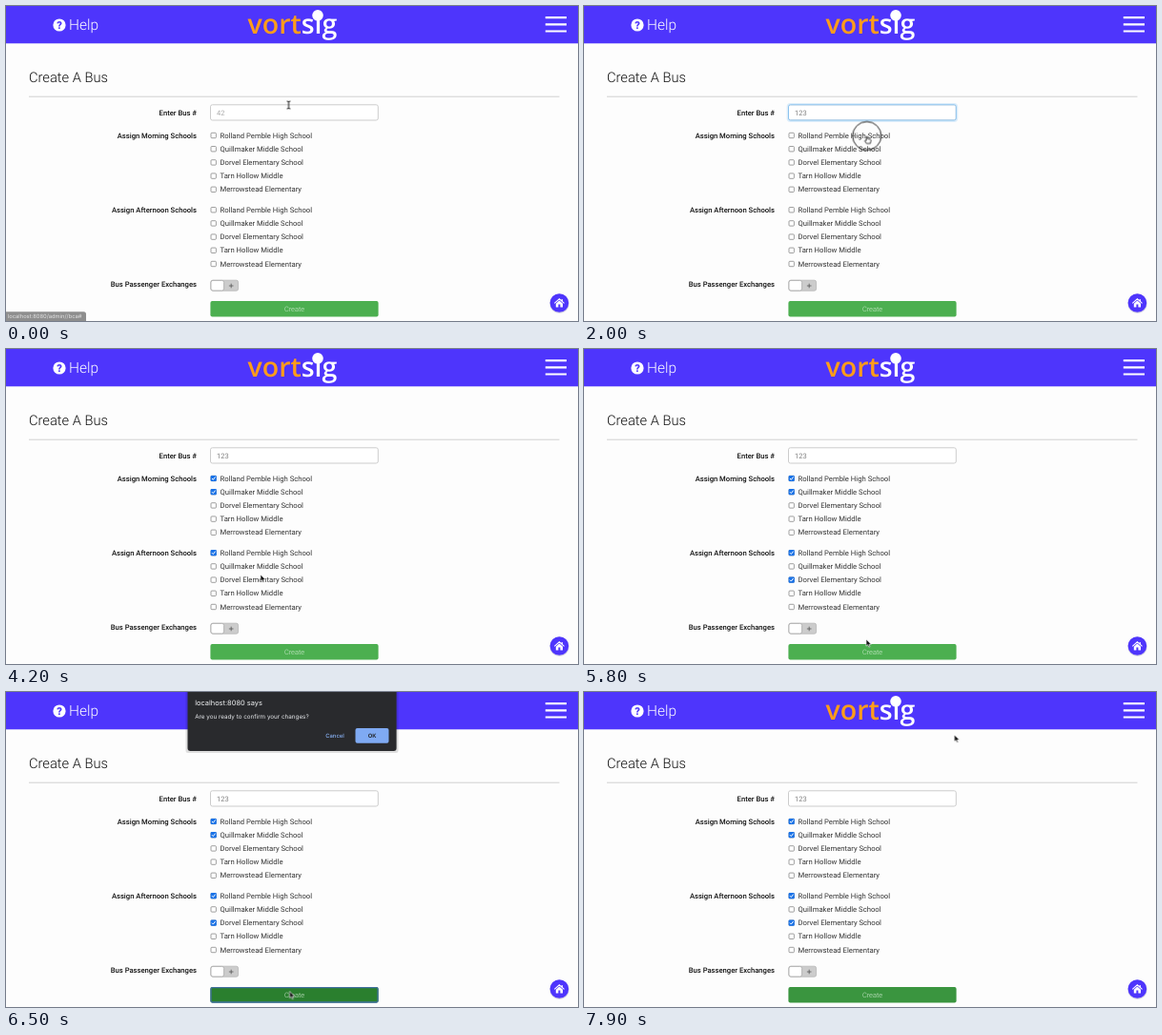
An HTML page that plays this animation: 600 px wide and 331 px high, repeating every 8000 ms.

```html
<!DOCTYPE html>
<html lang="en">
<head>
<meta charset="utf-8">
<title>Create A Bus</title>
<style>
html, body { margin: 0; width: 100%; height: 100%; overflow: hidden; background: #fdfdfd; }
svg { display: block; width: 600px; height: 331px; font: 400 7.7px Roboto, sans-serif; fill: #333; text-rendering: geometricPrecision; }
.label { font-weight: 500; font-size: 7.65px; fill: #111; text-anchor: end; }
.light { font-weight: 300; }
.mid { text-anchor: middle; }
.sys { font-family: Inter, sans-serif; }
.brand { font: 600 28.5px "Open Sans", sans-serif; fill: #ff9c1a; }
.box { fill: #fff; stroke: #777; stroke-width: .7; }

#cursor { animation: travel 8s linear infinite; }
#ring { fill: none; stroke: #222; animation: click 8s linear infinite; }
#create { fill: #4caf50; animation: press 8s linear infinite; }

@keyframes travel {
  0% { transform: translate(296.5px, 104px); }
  3.75%, 20% { transform: translate(296.5px, 111px); }
  23.75%, 27.5% { transform: translate(296.7px, 136.5px); }
  32.5%, 36.25% { transform: translate(290px, 150px); }
  43.75%, 47.5% { transform: translate(272px, 214px); }
  52.5% { transform: translate(267px, 237px); }
  56.25%, 61.25% { transform: translate(267px, 242px); }
  72.5% { transform: translate(296px, 305px); }
  76.25%, 85% { transform: translate(297.5px, 314.5px); }
  92.5% { transform: translate(388px, 44px); }
  98.75%, 100% { transform: translate(388.5px, 45px); }
}
@keyframes press {
  0%, 77.4% { fill: #4caf50; }
  78.7%, 97.5% { fill: #2a7f2e; }
  98.75% { fill: #3a953f; }
  100% { fill: #46a64a; }
}
</style>
</head>
<body>
<svg viewBox="0 0 600 331">
  <rect width="600" height="331" fill="#fdfdfd"/>
  <text class="light" x="24" y="79.5" font-size="14.7" fill="#111">Create A Bus</text>
  <path d="M24 95.2H580.5" stroke="#d0d0d0"/>

  <text class="label" x="200" y="114.6">Enter Bus #</text>
  <rect x="214.5" y="103.8" width="175.8" height="16.2" rx="2" fill="#fff" stroke="#ccc"/>
  <g data-show="500-2100" fill="none">
    <rect x="213.6" y="102.9" width="177.6" height="18" rx="3" stroke="#dcedfa" stroke-width="2"/>
    <rect x="214.5" y="103.8" width="175.8" height="16.2" rx="2" stroke="#8cc3ee"/>
  </g>
  <g font-size="7.5" fill="#808080">
    <text x="221" y="114.7" fill="#aaa" data-show="0-1000">42</text>
    <text x="221" y="114.7" data-show="1000-1200">1</text>
    <text x="221" y="114.7" data-show="1200-1400">12</text>
    <text x="221" y="114.7" data-show="1400-8000">123</text>
  </g>

  <text class="label" x="200" y="138.7">Assign Morning Schools</text>
  <text class="label" x="200" y="216.9">Assign Afternoon Schools</text>
  <g id="schools"></g>

  <text class="label" x="200" y="295.3">Bus Passenger Exchanges</text>
  <rect x="214.8" y="288.2" width="28.8" height="11" rx="2" fill="#ccc" stroke="#b5b5b5" stroke-width=".8"/>
  <rect x="215" y="288.4" width="13.6" height="10.6" rx="2" fill="#fff" stroke="#aaa" stroke-width=".8"/>
  <path d="M233.9 294h4.6M236.2 291.7v4.6" stroke="#555" stroke-width=".8"/>

  <rect id="create" x="214.4" y="310" width="176.2" height="16.6" rx="2"/>
  <rect x="215" y="310.6" width="175" height="15.4" rx="1.5" fill="none" stroke="#3f6f9e" stroke-width="1.3" data-show="6200-7800"/>
  <text class="light mid" x="302.5" y="321" font-size="7.4" fill="#d3ecd4">Create</text>

  <circle cx="580.5" cy="312.8" r="10.2" fill="#d4d2e2"/>
  <circle cx="580.4" cy="312" r="9.8" fill="#4e35fc"/>
  <path d="M575.3 312.4L580.4 307.8L585.5 312.4M583.2 308v2" fill="none" stroke="#fff" stroke-width="1.1"/>
  <path d="M576.8 312.8L580.4 309.6L584 312.8V316.4H581.4V313.6H579.4V316.4H576.8Z" fill="#fff"/>

  <g data-show="0-300">
    <path d="M0 321.3H81.5Q84 321.3 84 323.8V331H0Z" fill="#8e8e8e"/>
    <text class="sys" x="1.8" y="328.2" font-size="5.8" fill="#e4e4e4">localhost:8080/admin//bca#</text>
  </g>

  <rect width="600" height="39.3" fill="#4e35fc"/>
  <circle cx="56" cy="20" r="6.6" fill="#fff"/>
  <text class="mid" x="56" y="23.9" font-size="11" font-weight="900" fill="#4e35fc">?</text>
  <text class="light" x="66" y="25.4" font-size="15.5" fill="#fff">Help</text>
  <text class="brand" x="253.5" y="28.8">vort<tspan fill="#fff">sig</tspan></text>
  <circle cx="327" cy="9.8" r="5.8" fill="#fff"/>
  <path d="M565.8 12.1H588M565.8 19.3H588M565.8 26.5H588" stroke="#fff" stroke-width="2.2"/>

  <g class="sys" data-show="6400-7800">
    <path d="M188.5 0H411.5V62Q411.5 64 409 64H191Q188.5 64 188.5 62Z" fill="#000" opacity=".12"/>
    <path d="M190.5 0H409.6V59Q409.6 62 406.6 62H193.5Q190.5 62 190.5 59Z" fill="#292a2d"/>
    <text x="198.2" y="13.7" font-size="7.45" fill="#f1f3f4">localhost:8080 says</text>
    <text x="198.2" y="28" font-size="6.3" fill="#e8eaed">Are you ready to confirm your changes?</text>
    <text x="335.2" y="47.8" font-size="5.9" font-weight="500" fill="#8ab4f8">Cancel</text>
    <rect x="366.5" y="38" width="35" height="15.8" rx="2" fill="#7faaf3"/>
    <rect x="366.5" y="38" width="35" height="15.8" rx="2" fill="#7592cc" data-show="7500-7800"/>
    <text class="mid" x="384" y="47.9" font-size="5.9" font-weight="600" fill="#202124">OK</text>
  </g>

  <g id="cursor">
    <circle id="ring" r="15"/>
    <g data-show="0-1000 1500-1800" fill="none">
      <path d="M-1.8 -4Q0 -4 0 -3V3Q0 4 -1.8 4M1.8 -4Q0 -4 0 -3M1.8 4Q0 4 0 3" stroke="#111"/>
    </g>
    <path data-show="1800-3900 4400-5000 6000-6400" fill="#fff" stroke="#111" stroke-width=".8" stroke-linejoin="round"
      d="M-.7 .9Q0 .2 .7 .9V3L3.6 3.5Q4.5 3.9 4.3 4.8L3.6 8H-.4L-2.4 5.2Q-2.2 4.2 -.7 5Z"/>
    <path data-show="3900-4400 5000-6000 6400-8000" fill="#111" stroke="#fff" stroke-width=".6" stroke-linejoin="round"
      d="M0 0V7.2L1.7 5.7L2.8 8.2L4 7.7L2.9 5.3H5.2Z"/>
  </g>
</svg>
<script>
const LOOP = 8000;
const pct = ms => ms / LOOP * 100 + '%';
const schools = ['Rolland Pemble High School', 'Quillmaker Middle School',
  'Dorvel Elementary School', 'Tarn Hollow Middle', 'Merrowstead Elementary'];

// Moment each box gets ticked, by list and row
const lists = [
  { top: 136, ticks: { 0: 2100, 1: 2800 } },
  { top: 214.2, ticks: { 0: 3600, 2: 4700 } }
];

const row = (name, y, tick) => `
  <rect class="box" x="215" y="${y - 2.7}" width="5.4" height="5.4" rx=".9"/>
  ${tick ? `<g data-show="${tick}-${LOOP}">
    <rect x="214.6" y="${y - 3.1}" width="6.2" height="6.2" rx="1" fill="#1a73e8"/>
    <path d="M216 ${y}l1.3 1.4 2.3 -3" fill="none" stroke="#fff"/></g>` : ''}
  <text x="224.5" y="${y + 2.6}">${name}</text>`;

document.getElementById('schools').innerHTML = lists.map(({ top, ticks }) =>
  schools.map((name, i) => row(name, top + i * 14.2, ticks[i])).join('')).join('');

let css = '';

// Show each part only during its time spans
document.querySelectorAll('[data-show]').forEach((el, i) => {
  css += `@keyframes show${i}{0%{opacity:0}`;
  for (const span of el.dataset.show.split(' ')) {
    const [from, to] = span.split('-').map(Number);
    css += `${pct(from)}{opacity:1}`;
    if (to < LOOP) css += `${pct(to)}{opacity:0}`;
  }
  css += '}';
  el.style.animation = `show${i} ${LOOP}ms step-end infinite`;
});

// Ring appears at full size on a click, then shrinks and fades
css += '@keyframes click{0%{opacity:0}';
for (const t of [400, 2000, 2700, 3600, 4600, 6200, 7600]) {
  css += `${pct(t - 41)}{opacity:0}
    ${pct(t - 40)},${pct(t + 15)}{opacity:1;r:15px}
    ${pct(t + 100)}{opacity:.7;r:10px}
    ${pct(t + 180)}{opacity:0;r:9px}`;
}
css += '100%{opacity:0}}';

document.head.appendChild(document.createElement('style')).textContent = css;
</script>
</body>
</html>
```
